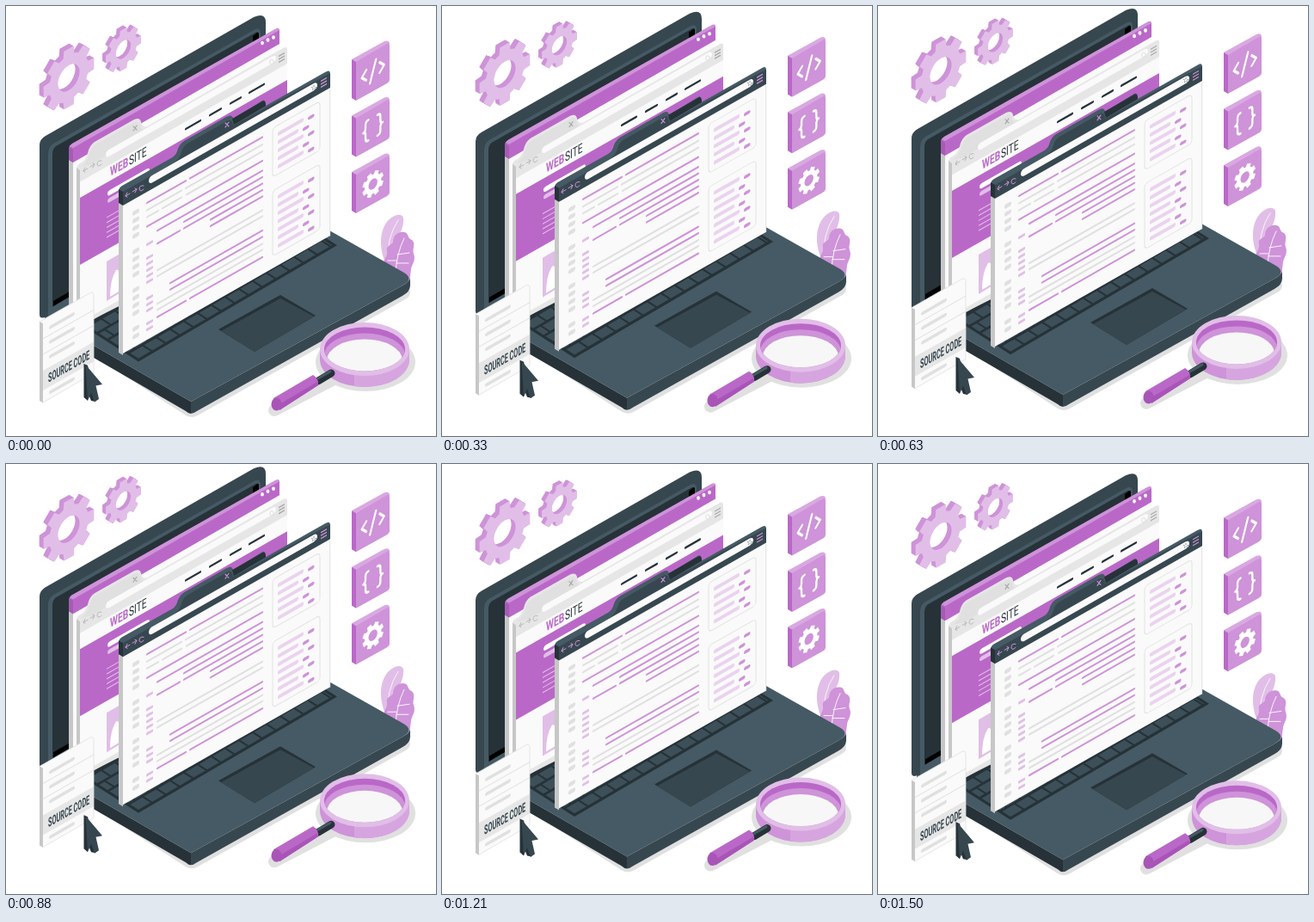
Animation, 500 px wide and 500 px high, one loop 1540 ms. Source, as an HTML page with a canvas:

```html
<!DOCTYPE html>
<html lang="en">
<head>
<meta charset="utf-8">
<title>Source code</title>
<style>
html, body { margin: 0; width: 100%; height: 100%; overflow: hidden; background: #fff; }
canvas { display: block; width: 500px; height: 500px; }
</style>
</head>
<body>
<canvas id="stage" width="500" height="500"></canvas>
<script>
const ctx = document.getElementById('stage').getContext('2d');
const LOOP = 1540, FRAMES = 37, SLOPE = 0.57;
const PURPLE = '#ba68c8', LILAC = '#ce93d8', PALE = '#e1bee7';
const INK = '#263238', SLATE = '#37474f', STEEL = '#455a64';
const PAPER = '#fafafa', GREY = '#e0e0e0', EDGE = '#c7c7c7';

function shape(color, d) {
  ctx.fillStyle = color;
  ctx.fill(new Path2D(d));
}

function line(color, width, d) {
  ctx.strokeStyle = color;
  ctx.lineWidth = width;
  ctx.lineCap = ctx.lineJoin = 'round';
  ctx.stroke(new Path2D(d));
}

// Runs a drawing on an upright plane that rises to the right.
function plane(x, y, scale, draw) {
  ctx.save();
  ctx.transform(scale, -SLOPE * scale, 0, 1, x, y);
  draw();
  ctx.restore();
}

// Pill whose middle line starts at (x, y).
function bar(color, x, y, w, h, r = h / 2) {
  plane(x, y, 1, () => {
    ctx.fillStyle = color;
    ctx.beginPath();
    ctx.roundRect(0, -h / 2, w, h, r);
    ctx.fill();
  });
}

function label(text, x, y, size, weight, color, scale) {
  plane(x, y, scale, () => {
    ctx.font = `${weight} ${size}px Roboto, sans-serif`;
    ctx.fillStyle = color;
    ctx.fillText(text, 0, 0);
  });
}

function ellipse(color, x, y, rx, ry) {
  ctx.fillStyle = color;
  ctx.beginPath();
  ctx.ellipse(x, y, rx, ry, 0, 0, 7);
  ctx.fill();
}

function gearPath(radius, hole, phase = 0) {
  const path = new Path2D(), root = radius * 0.77, turn = Math.PI / 4;
  for (let i = 0; i < 8; i++) {
    for (const [r, a] of [[root, -0.28], [radius, -0.19], [radius, 0.19], [root, 0.28]]) {
      const angle = i * turn + phase + a;
      path.lineTo(r * Math.cos(angle), r * Math.sin(angle));
    }
  }
  path.closePath();
  path.moveTo(hole, 0);
  path.arc(0, 0, hole, 0, Math.PI * 2);
  return path;
}

function gear(x, y, radius, hole, depth) {
  const path = gearPath(radius, hole);
  for (let k = depth; k >= 0; k -= 0.5) {
    plane(x - k, y - k * 0.6, 0.866, () => {
      ctx.fillStyle = k ? LILAC : PALE;
      ctx.fill(path, 'evenodd');
    });
  }
}

function leaves() {
  shape(PALE, 'M444 304C434 286 433 264 443 251C450 243 459 240 462 246C463 256 459 263 454 272C449 282 446 294 449 306Z');
  line('#fff', 0.8, 'M444 300Q442 270 456 249');
  shape(LILAC, 'M439 303C438 294 444 292 443 285C441 279 448 278 450 275C450 266 457 262 463 263C469 264 466 270 472 272C477 276 472 283 474 288C477 296 472 300 471 306L469 322L452 318Z');
  line('#fff', 0.9, 'M453 311Q454 288 463 270M454 296L444 296M455 289L469 287M454 299L468 299');
}

function keyboard() {
  const at = (a, b) => `${154 + a - b} ${411 - 0.585 * a - 0.64 * b}`;
  const key = (color, a, b, w, h) =>
    shape(color, `M${at(a, b)}L${at(a + w, b)}L${at(a + w, b + h)}L${at(a, b + h)}Z`);
  key(INK, -2, -2, 231, 66);
  for (let row = 0; row < 5; row++) {
    for (let a = row % 2 ? -8 : 0; a < 226; a += 16) {
      const left = Math.max(a, 0);
      key('#3d5059', left + 1, row * 12 + 1, Math.min(a + 14, 225) - left, 9.5);
    }
  }
}

function laptop() {
  shape(GREY, 'M130 425L209 476Q216 480 223 476L466 340Q472 336 469 328L215 462Z');
  leaves();
  shape(STEEL, 'M45 362L215 460L461 325Q476 317 461 309L376 261L290 215Z');
  shape(INK, 'M45 362L215 460V474Q212 474 209 471L45 376Z');
  shape(SLATE, 'M215 460L461 325Q470 320 470 316V325Q470 332 461 337L222 471Q218 474 215 474Z');
  keyboard();
  shape(INK, 'M247 376L319 336L360 360L289 402Z');
  shape(SLATE, 'M250 378L319 340L358 361L289 402Z');

  shape(SLATE, 'M39 359V162Q39 155 46 151L288 13Q302 7 302 19V240L62 360L45 362Q39 364 39 359Z');
  shape(STEEL, 'M49 361V172Q49 164 55 160L290 27Q296 25 296 32V200L54 360Z');
  shape(INK, 'M54 350V172Q54 166 58 163L290 31Q294 29 294 33V200Z');
  shape('#000', 'M55 349V343L74 332V338ZM287 35L292 31Q294 30 294 33V41L287 44Z');
}

function browserMarks(color, x, y) {
  line(color, 1, `M${x + 5} ${y - 3}L${x} ${y}L${x + 2} ${y - 4}M${x} ${y}L${x + 2} ${y + 1}` +
    `M${x + 8} ${y - 5}L${x + 13} ${y - 8}L${x + 11} ${y - 9}M${x + 13} ${y - 8}L${x + 11} ${y - 4}` +
    `M${x + 21} ${y - 12}Q${x + 16} ${y - 13} ${x + 16} ${y - 8}Q${x + 17} ${y - 4} ${x + 21} ${y - 8}`);
}

function cross(color, x, y) {
  line(color, 1.1, `M${x - 2} ${y - 2}L${x + 2} ${y + 2}M${x - 2} ${y + 3}L${x + 2} ${y - 3}`);
}

function menu(color, x, y) {
  for (const dy of [-3.5, 0, 3.5]) bar(color, x, y + dy, 7, 1.4, 0);
}

function sitePage() {
  shape(PAPER, 'M73 180L318 43V240L78 378L73 375Z');
  shape(EDGE, 'M73 178L78 181V378L73 375Z');
  shape(PURPLE, 'M73 166Q73 162 77 160L313 27Q318 24 318 29V44L78 182L73 179Z');
  shape(LILAC, 'M74 163L77 160L313 27Q317 25 318 28L78 165Z');
  shape('#a55cb2', 'M73 164L78 167V182L73 179Z');
  for (const [x, y] of [[298, 43], [304.5, 39.5], [311, 36.5]]) ellipse('#fff', x, y, 1.9, 2.3);

  shape('#e6e6e6', 'M82 190Q82 185 86 183Q93 180 95 171Q97 162 103 158L149 132Q156 129 157 135Q158 142 164 140L322 49Q327 46 327 51V250L86 372L82 370Z');
  shape(GREY, 'M86 187Q95 182 97 172Q99 164 104 161L150 135Q155 133 156 138Q157 146 163 144L100 184Z');
  shape(PAPER, 'M86 204.5L327 67V231L86 368Z');
  shape(EDGE, 'M82 188L86 191V372L82 370Z');
  bar(PAPER, 116, 173, 198, 8);
  ctx.strokeStyle = GREY;
  ctx.lineWidth = 1;
  ctx.beginPath();
  ctx.ellipse(309, 65, 2.3, 2.8, 0, 0, 7);
  ctx.stroke();
  browserMarks('#b8b8b8', 90, 192);
  cross('#a6a6a6', 150, 142);
  menu('#a6a6a6', 317, 62);
  label('WEB', 121, 198, 15, 'bold', PURPLE, 0.68);
  label('SITE', 143, 185.5, 15, 'normal', INK, 0.68);
  for (const [x, w] of [[208, 19], [236, 15], [260, 14], [282, 19]])
    bar(INK, x, 143.5 - (x - 208) * SLOPE, w, 2.6, 1);

  shape(PURPLE, 'M86 223L327 86V164L86 301Z');
  bar('#fff', 118, 218.5, 49, 6);
  bar(PALE, 118, 227, 36, 5);
  for (let i = 0; i < 5; i++) bar(PALE, 117, 246 + i * 5.8, 40, 1.2, 0);
  shape(PALE, 'M117 297L150 278V323L117 343Z');
  shape('#fff', 'M121 338Q121 318 128 307Q133 304 136 329Z');
}

function codePage() {
  shape(STEEL, 'M131 216Q131 211 135 209L190 178Q197 175 199 169Q201 161 207 157L256 129Q263 125 264 131L298 110Q302 108 302 116L371 77Q377 73 377 79V110L136 240L131 236Z');
  shape(INK, 'M263 131L298 111Q302 109 302 116L265 138Z');
  shape(SLATE, 'M136 216L194 183Q202 178 204 170Q206 163 211 160L258 133Q263 131 264 139L377 78V100L136 236Z');
  shape(PAPER, 'M136 232L377 95V267L136 404Z');
  line(GREY, 1, 'M376.7 97V267');
  shape(INK, 'M131 213L136 216V233L131 230Z');
  shape(EDGE, 'M131 229L136 232V406L131 403Z');
  bar(PAPER, 166, 203.5, 196, 8.5);
  ctx.fillStyle = SLATE;
  ctx.font = '9px "DejaVu Sans", sans-serif';
  ctx.textAlign = 'center';
  ctx.fillText('☆', 358, 97.5);
  ctx.textAlign = 'start';
  browserMarks(LILAC, 139, 221);
  cross(LILAC, 257, 138);
  menu(LILAC, 366, 91);

  const code = (color, y, ...spans) => {
    for (const [from, to] of spans)
      bar(color, from, y + (299 - from) * SLOPE, to - from, 2.3, 1);
  };
  code(LILAC, 152, [163, 210], [213, 299]);
  code(GREY, 160.5, [163, 205], [208, 299]);
  code(GREY, 168.5, [163, 178], [181, 205], [209, 299]);
  code(LILAC, 179.5, [163, 299]);
  code(LILAC, 191, [175, 299]);
  code(LILAC, 198.5, [206, 299]);
  code(LILAC, 206, [175, 203], [206, 299]);
  code(LILAC, 213.5, [237, 299]);
  code(LILAC, 221, [237, 299]);
  code(GREY, 237, [175, 299]);
  code(GREY, 244, [175, 299]);
  code(LILAC, 260.5, [190, 299]);
  code(LILAC, 268, [190, 299]);
  code(GREY, 276, [175, 299]);
  code(GREY, 283, [175, 299]);
  code(LILAC, 291.5, [175, 210], [213, 299]);

  for (const top of [240, 285, 330, 375])
    for (let i = 0; i < (top < 375 ? 4 : 2); i++) bar(GREY, 147, top + 2 + i * 9, 8, 5, 2);
  for (const y of [276, 292, 299, 306, 313, 320, 339, 346, 353, 368, 375])
    bar(PALE, 163, y + 2, 8, 3.2, 1);

  for (const [y, h, rows] of [[142, 57, 5], [215, 76, 7]]) {
    plane(310, y, 1, () => {
      ctx.strokeStyle = GREY;
      ctx.lineWidth = 0.9;
      ctx.beginPath();
      ctx.roundRect(0, 0, 55, h, 4);
      ctx.stroke();
    });
    for (let i = 0; i < rows; i++) {
      const rowY = y + 7 + i * 9.5;
      const shift = i % 2 ? 0 : 6;
      bar('#ead3ee', 316, rowY, 24 + shift, 4.5, 1.5);
      bar(LILAC, 345 + shift, rowY - (29 + shift) * SLOPE + 2, 7.5, 3.8, 1.7);
    }
  }
}

function sourceCard() {
  shape(PAPER, 'M39 367L98 333.5Q102 332 102 336V427L43 461L39 459Z');
  shape(EDGE, 'M39 367L43 369V461.5L39 459Z');
  shape('#e6e6e6', 'M43 424L102 390.4V413.4L43 447Z');
  for (const y of [18, 36]) line(GREY, 1, `M43 ${369 + y}L102 ${335.4 + y}`);
  line(GREY, 0.8, 'M39 367L98 333.5Q102 332 102 336V427L43 461');
  for (const y of [374.5, 391.5, 408.5, 450]) bar(GREY, 50, y, 30, 4);
  label('SOURCE CODE', 49, 438, 15, 'bold', SLATE, 0.485);
}

function cursor() {
  shape(INK, 'M90.5 416L95 418L101 444L104 460L99 459L95 449L95 459L90.5 455Z');
  shape(SLATE, 'M92.5 417L112 440L104.5 441.5L108 457L103 460.5L99 449.5L95 459Z');
}

function tile(y, drawMark) {
  ctx.save();
  ctx.translate(0, y);
  shape('#d9a8e2', 'M402 62L440 41Q446 39 446 44L407 66Z');
  shape(PURPLE, 'M402 62L407 65V110L402 107Z');
  shape(LILAC, 'M407 65L443 44Q446 42 446 46V86Q446 88 443 90L407 110Z');
  plane(426.7, 76, 0.866, drawMark);
  ctx.restore();
}

function tiles() {
  tile(0, () => line('#fff', 2.8, 'M-9 -6L-15 0L-9 6M4 -12L-4 12M9 -6L15 0L9 6'));
  tile(65.5, () => line('#fff', 2.7,
    'M-6 -12Q-10 -12 -10 -8V-4Q-10 0 -13 0Q-10 0 -10 4V8Q-10 12 -6 12' +
    'M6 -12Q10 -12 10 -8V-4Q10 0 13 0Q10 0 10 4V8Q10 12 6 12'));
  tile(131, () => {
    ctx.fillStyle = '#fff';
    ctx.fill(gearPath(14.5, 6, Math.PI / 8), 'evenodd');
  });
}

function magnifier() {
  ellipse(GREY, 418, 414, 58, 34);
  line(GREY, 14, 'M312 470L385 432');
  shape(LILAC, 'M365 399V411A52 32 0 0 0 469 411V399Z');
  shape('#d6a5df', 'M405 429V442A52 32 0 0 0 469 411V399Z');
  ellipse(PALE, 417, 399, 52, 31);
  ctx.save();
  ctx.beginPath();
  ctx.ellipse(417, 399, 47, 25.5, 0, 0, 7);
  ctx.clip();
  ellipse(PURPLE, 417, 399, 48, 27);
  ellipse(LILAC, 417, 406, 47, 25.5);
  ellipse('#f7f7f7', 417, 412, 44, 24.5);
  ctx.restore();

  line(INK, 9, 'M363 436L378 427');
  line(STEEL, 3, 'M363 433L377 425');
  shape(PURPLE, 'M311 456L357 429Q364 433 363 441L318 470Z');
  shape('#a855b7', 'M318 463L362 437L363 441L318 470Z');
  ellipse('#a855b7', 314.5, 463, 6, 7.5);
}

// Height above the resting place: up and down at a constant speed.
function lift(ms) {
  const phase = ((ms + 35) % LOOP) / LOOP;
  return 10 * (1 - Math.abs(1 - 2 * phase));
}

function shifted(dy, draw) {
  ctx.save();
  ctx.translate(0, dy);
  draw();
  ctx.restore();
}

function render(now) {
  const step = Math.floor(((now % LOOP) + 5) / LOOP * FRAMES);
  const dy = lift(0) - lift(step * LOOP / FRAMES);
  ctx.fillStyle = '#fff';
  ctx.fillRect(0, 0, 500, 500);
  shifted(dy, () => {
    gear(73, 83.5, 34.5, 14.5, 5);
    gear(136.5, 50.5, 24, 10, 4);
    tiles();
    laptop();
    sitePage();
    codePage();
  });
  shifted(dy * 2, sourceCard);
  shifted(dy, () => {
    cursor();
    magnifier();
  });
}

const start = performance.now();
function tick() {
  render(performance.now() - start);
  requestAnimationFrame(tick);
}
tick();
</script>
</body>
</html>
```
